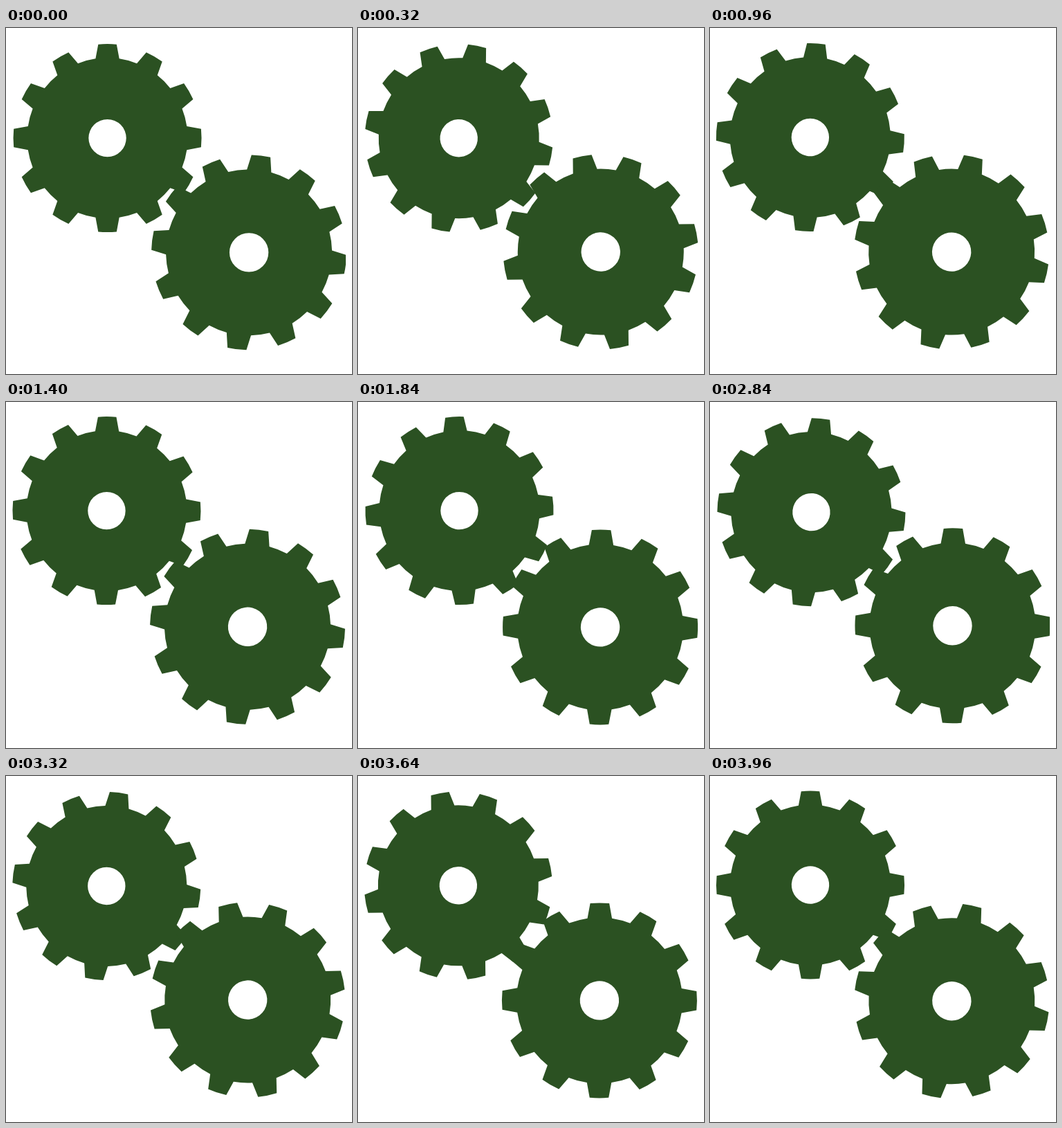
These frames come from a looping animation (500x500 px, 4000 ms). An HTML page:

```html
<!DOCTYPE html>
<html lang="en">
<head>
<meta charset="utf-8">
<title>Gears</title>
<style>
  html, body { margin: 0; width: 100%; height: 100%; overflow: hidden; background: #fff; }
  svg { display: block; width: 100vw; height: 100vh; }
</style>
</head>
<body>
<svg viewBox="0 0 500 500">
  <clipPath id="stage"><rect width="491" height="500"/></clipPath>
  <g id="gears" fill="#2b5122" fill-rule="evenodd" clip-path="url(#stage)"></g>
</svg>
<script>
const FRAME_MS = 40, FRAMES = 100, TEETH = 12;

// Each gear turns about a pivot slightly off its centre, which makes it wobble.
const gears = [
  { pivot: [146, 158.1], offset: [0.55, 1], outer: 136, root: 116, hole: 27.2, phase: 0, turn: 510 },
  { pivot: [350, 324.3], offset: [1.1, 0.05], outer: 141, root: 120, hole: 28.2, phase: 7.1, turn: -595 }
];

function gearPath({ outer, root, hole, phase }) {
  const point = (radius, degrees) => {
    const a = (degrees + phase - 90) * Math.PI / 180;
    return `${radius * Math.cos(a)} ${radius * Math.sin(a)}`;
  };
  const arc = (radius, degrees) => `A${radius} ${radius} 0 0 1 ${point(radius, degrees)}`;
  let path = `M${point(root, -8.5)}`;
  for (let i = 0; i < TEETH; i++) {
    const mid = i * 360 / TEETH;
    path += `L${point(outer, mid - 5.6)}${arc(outer, mid + 5.6)}`
          + `L${point(root, mid + 8.5)}${arc(root, mid + 360 / TEETH - 8.5)}`;
  }
  return `${path}ZM${hole} 0A${hole} ${hole} 0 1 1 ${-hole} 0A${hole} ${hole} 0 1 1 ${hole} 0Z`;
}

for (const gear of gears) {
  gear.node = document.createElementNS("http://www.w3.org/2000/svg", "path");
  gear.node.setAttribute("d", gearPath(gear));
  document.getElementById("gears").append(gear.node);
}

function draw(now) {
  const step = Math.floor(now / FRAME_MS) % FRAMES;
  for (const { node, pivot, offset, turn } of gears) {
    const angle = turn * step / (FRAMES - 1);
    node.setAttribute("transform", `translate(${pivot}) rotate(${angle}) translate(${offset})`);
  }
  requestAnimationFrame(draw);
}
draw(0);
</script>
</body>
</html>
```
